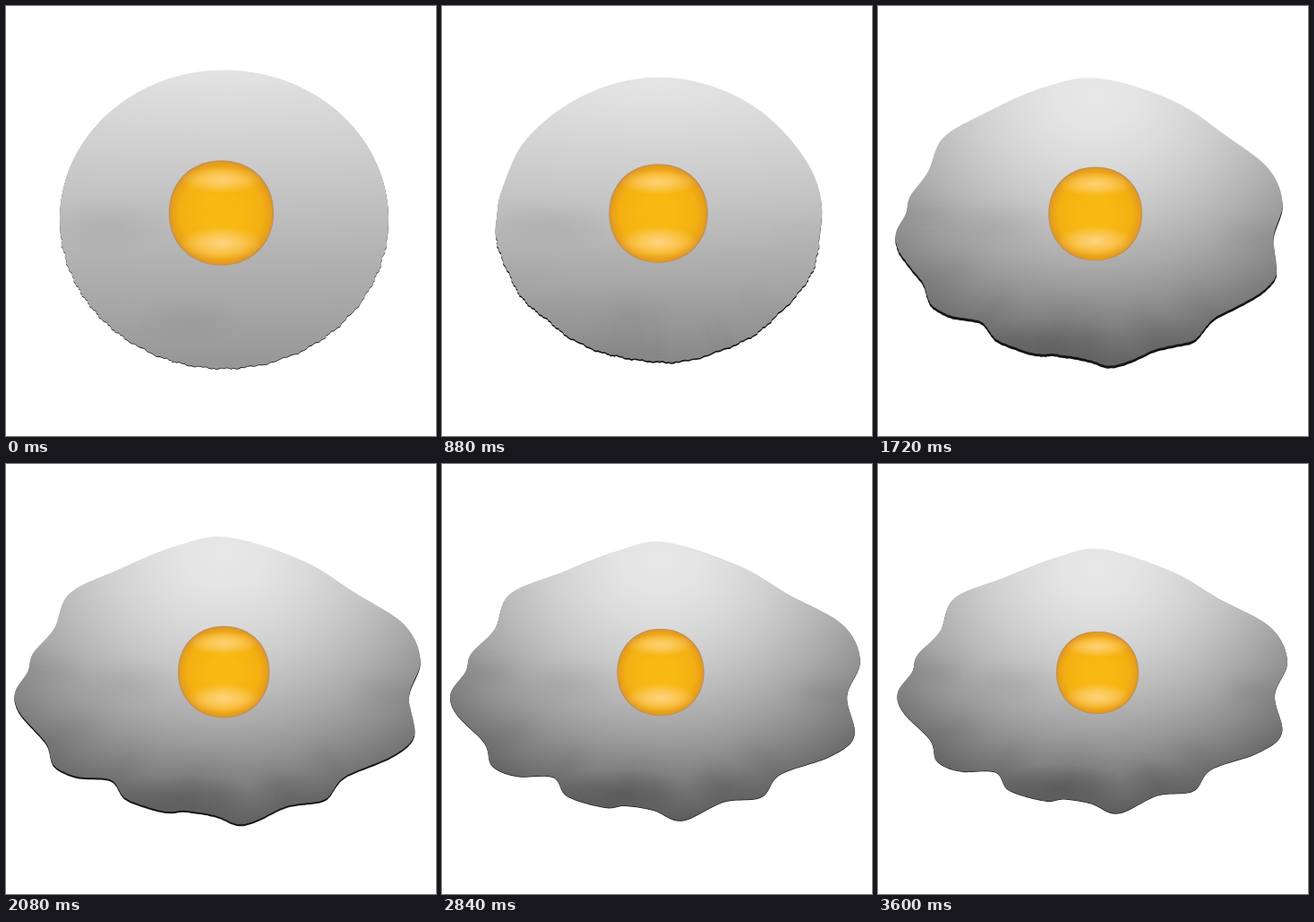
These frames come from a looping animation (480x480 px, 3.64 s). An HTML page with a canvas:

```html
<!DOCTYPE html>
<html lang="en">
<head>
<meta charset="utf-8">
<title>Fried egg</title>
<style>
  html, body { margin: 0; width: 100%; height: 100%; overflow: hidden; background: #fff; }
  canvas { display: block; }
</style>
</head>
<body>
<canvas id="stage" width="480" height="480"></canvas>
<script>
const ctx = document.getElementById('stage').getContext('2d');
const LOOP = 3640, STEP = 40, END_SIZE = 0.787, PARTS = 12;
const pivot = [262, 240];
const oval = { x: 243.5, y: 238, rx: 183.5, ry: 166.5 };
const mix = (a, b, k) => a + (b - a) * k;

// Tips and notches of the ruffled edge, clockwise from the top.
const ruffle = [
  [250, 95], [328, 120], [380, 150], [438, 182], [457, 220], [443, 258], [451, 300],
  [425, 322], [372, 341], [352, 365], [312, 370], [268, 390], [238, 379], [208, 374],
  [186, 376], [146, 364], [131, 344], [92, 343], [66, 332], [58, 308], [28, 277],
  [22, 255], [38, 232], [44, 213], [69, 187], [85, 150], [140, 127], [200, 104]
].map(p => p.map((v, i) => pivot[i] + (v - pivot[i]) / END_SIZE));

const neighbour = (i, k) => ruffle[(i + k + ruffle.length) % ruffle.length];

// Notches are the corners that turn inwards.
const notches = ruffle.filter(([x, y], i) => {
  const [ax, ay] = neighbour(i, -1), [bx, by] = neighbour(i, 1);
  return y > 180 && (x - ax) * (by - y) < (y - ay) * (bx - x);
});

function spline(a, b, c, d, t) {
  return b + t / 2 * (c - a + t * (2 * a - 5 * b + 4 * c - d + t * (3 * (b - c) + d - a)));
}

// Moves a point of the ruffled edge back towards the smooth oval.
function morphPoint([x, y], m, rough = 0) {
  const a = Math.atan2((y - oval.y) / oval.ry, (x - oval.x) / oval.rx);
  const r = 1 + rough;
  return [
    mix(oval.x + oval.rx * r * Math.cos(a), x, m) - 5 * Math.sin(Math.PI * m),
    mix(oval.y + oval.ry * r * Math.sin(a), y, m)
  ];
}

function eggPath(m) {
  const path = new Path2D();
  for (let i = 0; i < ruffle.length * PARTS; i++) {
    const near = [-1, 0, 1, 2].map(k => neighbour(Math.floor(i / PARTS), k));
    const t = i % PARTS / PARTS;
    const point = [0, 1].map(k => spline(...near.map(p => p[k]), t));
    const noise = Math.sin(i * 2.3) + Math.sin(i * 0.71);
    path.lineTo(...morphPoint(point, m, point[1] > 270 ? 0.004 * noise : 0));
  }
  path.closePath();
  return path;
}

function blob(x, y, rx, ry, rgb, alpha) {
  ctx.save();
  ctx.translate(x, y);
  ctx.scale(rx, ry);
  const g = ctx.createRadialGradient(0, 0, 0, 0, 0, 1);
  g.addColorStop(0, `rgba(${rgb},${alpha})`);
  g.addColorStop(0.5, `rgba(${rgb},${alpha * 0.55})`);
  g.addColorStop(1, `rgba(${rgb},0)`);
  ctx.fillStyle = g;
  ctx.fillRect(-1, -1, 2, 2);
  ctx.restore();
}

// Light falls off from the top; the ruffled shape is lit like a dome.
function shade(k) {
  ctx.save();
  ctx.translate(240, mix(71, 80, k));
  ctx.scale(mix(1500, 420, k), mix(333, 350, k));
  const g = ctx.createRadialGradient(0, 0, 0, 0, 0, 1);
  for (let s = 0; s <= 1; s += 0.125) {
    const v = Math.round(mix(228 - 78 * s, 232 - 140 * s ** 1.7, k));
    g.addColorStop(s, `rgb(${v},${v},${v})`);
  }
  ctx.fillStyle = g;
  ctx.fillRect(-2, -2, 4, 4);
  ctx.restore();
}

function drawWhite(m) {
  const path = eggPath(m);
  ctx.save();
  ctx.save();
  ctx.translate(0, 0.8 + 2.8 * Math.sin(Math.PI * m));
  ctx.fillStyle = '#151515';
  ctx.fill(path);
  ctx.restore();

  ctx.clip(path);
  shade(Math.min(1, m * 2.5));
  blob(115, 245, 75, 32, '90,90,90', 0.1);
  blob(205, 350, 60, 30, '80,80,80', 0.08);
  blob(185, 392, 100, 32, '50,50,50', 0.3 * m);
  blob(330, 385, 60, 30, '60,60,60', 0.15 * m);

  ctx.filter = 'blur(9px)';
  ctx.lineWidth = 16;
  ctx.lineCap = 'round';
  ctx.strokeStyle = `rgba(60,60,60,${0.14 * m})`;
  ctx.beginPath();
  for (const notch of notches) {
    const [x, y] = morphPoint(notch, m);
    ctx.moveTo(x, y);
    ctx.lineTo(mix(x, 242, 0.22), mix(y, 232, 0.22));
  }
  ctx.stroke();
  ctx.restore();
}

function drawYolk() {
  const path = new Path2D();
  const bulge = v => 58.5 * Math.sign(v) * Math.abs(v) ** 0.95;
  for (let i = 0; i < 90; i++) {
    const a = i / 45 * Math.PI;
    path.lineTo(bulge(Math.cos(a)), bulge(Math.sin(a)));
  }
  path.closePath();
  ctx.save();
  ctx.translate(240.3, 231);
  const g = ctx.createRadialGradient(0, 0, 20, 0, 0, 60);
  g.addColorStop(0, '#f7b912');
  g.addColorStop(0.65, '#f4b012');
  g.addColorStop(0.88, '#e89f1a');
  g.addColorStop(1, '#cf9140');
  ctx.fillStyle = g;
  ctx.fill(path);
  ctx.clip(path);
  blob(0, -37, 46, 15, '255,212,125', 0.95);
  blob(0, 34, 47, 19, '255,214,135', 0.95);
  ctx.strokeStyle = 'rgba(185,145,95,.6)';
  ctx.lineWidth = 3;
  ctx.stroke(path);
  ctx.restore();
}

function draw() {
  const t = Math.floor(performance.now() % LOOP / STEP) * STEP;
  const u = Math.max(0, (t - 440) / 3160);
  const morph = 1 - (1 - u ** 1.9) ** 5;
  const size = 0.992 - 5.7e-5 * t + 0.008 * Math.exp(-t / 150);
  ctx.setTransform(1, 0, 0, 1, 0, 0);
  ctx.fillStyle = '#fff';
  ctx.fillRect(0, 0, 480, 480);
  ctx.setTransform(size, 0, 0, size, pivot[0] * (1 - size), pivot[1] * (1 - size));
  drawWhite(morph);
  drawYolk();
  requestAnimationFrame(draw);
}
draw();
</script>
</body>
</html>
```
